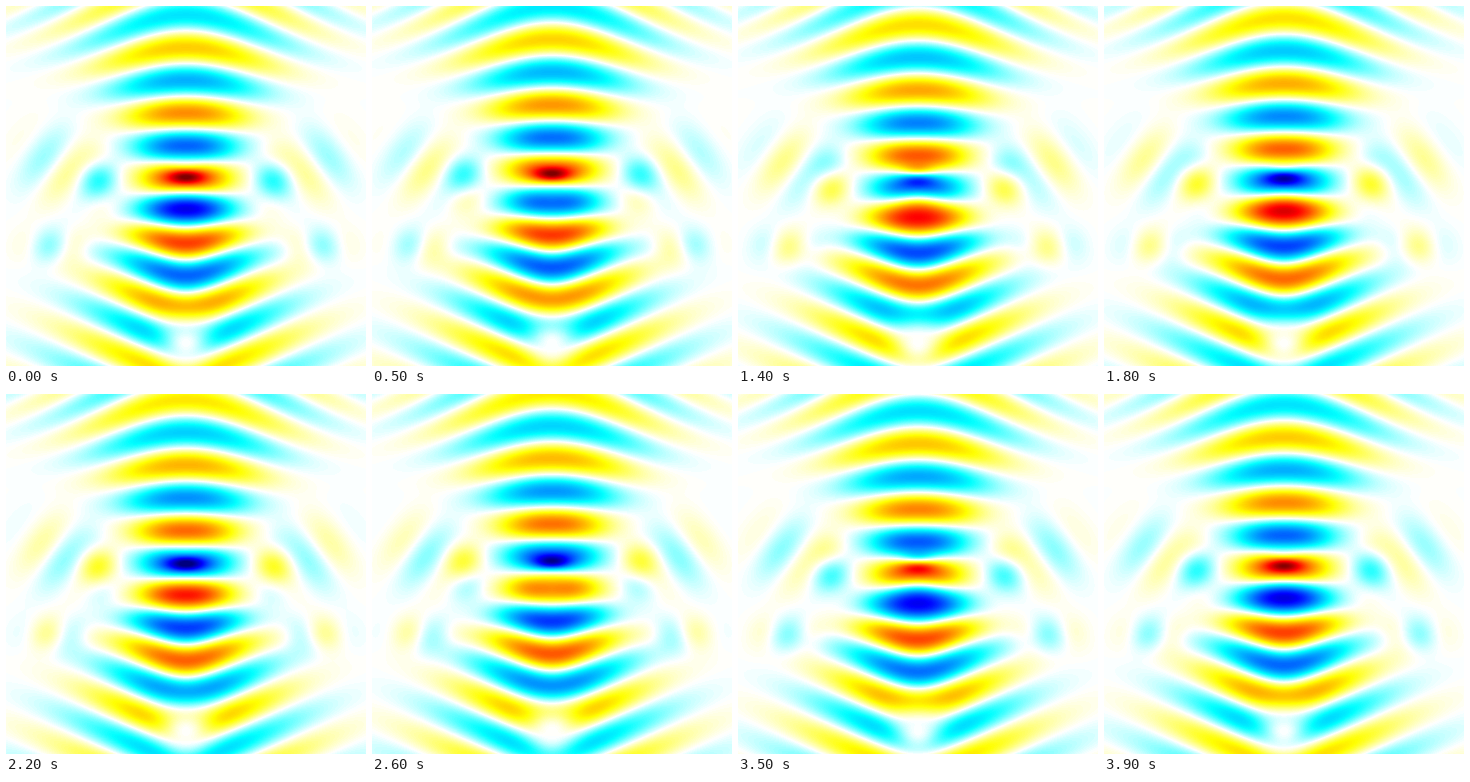
Recreate the animation shown at these times as a matplotlib script. Size 360 by 360 pixels, loop 4 s.

```python
import numpy as np
import matplotlib.pyplot as plt
from matplotlib.animation import FuncAnimation
from matplotlib.colors import LinearSegmentedColormap

SIZE, FRAMES, INTERVAL = 360, 40, 100
FOCUS = 172
RATE = 5.5  # phase gained per pixel of upward travel, in degrees


def wave(amp, degrees):
    return amp * np.exp(1j * np.radians(degrees))


def bump(d, y, d0, y0, rd, ry):
    return np.exp(-((d - d0) / rd) ** 2 - ((y - y0) / ry) ** 2)


def beam(d, y):
    """Focused beam: V-shaped fronts below the focus, arcs above it."""
    t = (FOCUS - y) / 100
    arc = 0.48 * t * (np.hypot(d, 85) - 85)
    vee = -0.45 * np.tanh(2.4 * t ** 2) * (np.hypot(d, 25) - 25)
    row = y - np.where(t > 0, arc, vee)
    width = np.hypot(44, 0.55 * (row - 180))
    amp = 0.66 / np.hypot(1, (row - 205) / 100) * np.exp(-(d / width) ** 2.5)
    amp *= 1 - bump(d, row, 0, 337, 28, 28)  # dark spot on the axis
    return wave(amp, RATE * (FOCUS - row))


def packet(d, y, amp, centre, radii, phase, out=0, up=0):
    """Local wave running outward and upward inside a soft ellipse."""
    (d0, y0), (rd, ry) = centre, radii
    return wave(amp * bump(d, y, d0, y0, rd, ry),
                phase + out * (d - d0) + up * (y0 - y))


ys, xs = np.mgrid[0:SIZE, 0:SIZE] + 0.5
d = np.abs(xs - SIZE / 2)

field = beam(d, ys)
# Scattering at the focus
field += packet(d, ys, 0.45, (0, 169), (17, 9), 35, up=8)
field += packet(d, ys, 0.40, (0, 196), (27, 14), 117)
# Side lobes
field += packet(d, ys, 0.20, (87, 175), (18, 26), 180, out=0.8, up=4)
field += packet(d, ys, 0.12, (130, 160), (36, 36), 85, out=4, up=3)
field += packet(d, ys, 0.11, (132, 240), (30, 18), 145, out=5, up=1)

cmap = LinearSegmentedColormap.from_list("wave", [
    (0, (0, 0, .5)), (.125, (0, 0, 1)), (.375, (0, 1, 1)), (.5, (1, 1, 1)),
    (.625, (1, 1, 0)), (.875, (1, 0, 0)), (1, (.5, 0, 0))])

fig = plt.figure(figsize=(3.6, 3.6), dpi=100)
ax = fig.add_axes([0, 0, 1, 1])
ax.axis("off")
image = ax.imshow(field.real, cmap=cmap, vmin=-1, vmax=1,
                  interpolation="nearest", aspect="auto")


def update(i):
    image.set_data((field * wave(1, -360 * i / FRAMES)).real)
    return [image]


anim = FuncAnimation(fig, update, frames=FRAMES, interval=INTERVAL,
                     repeat=True, repeat_delay=0)
plt.show()
```
